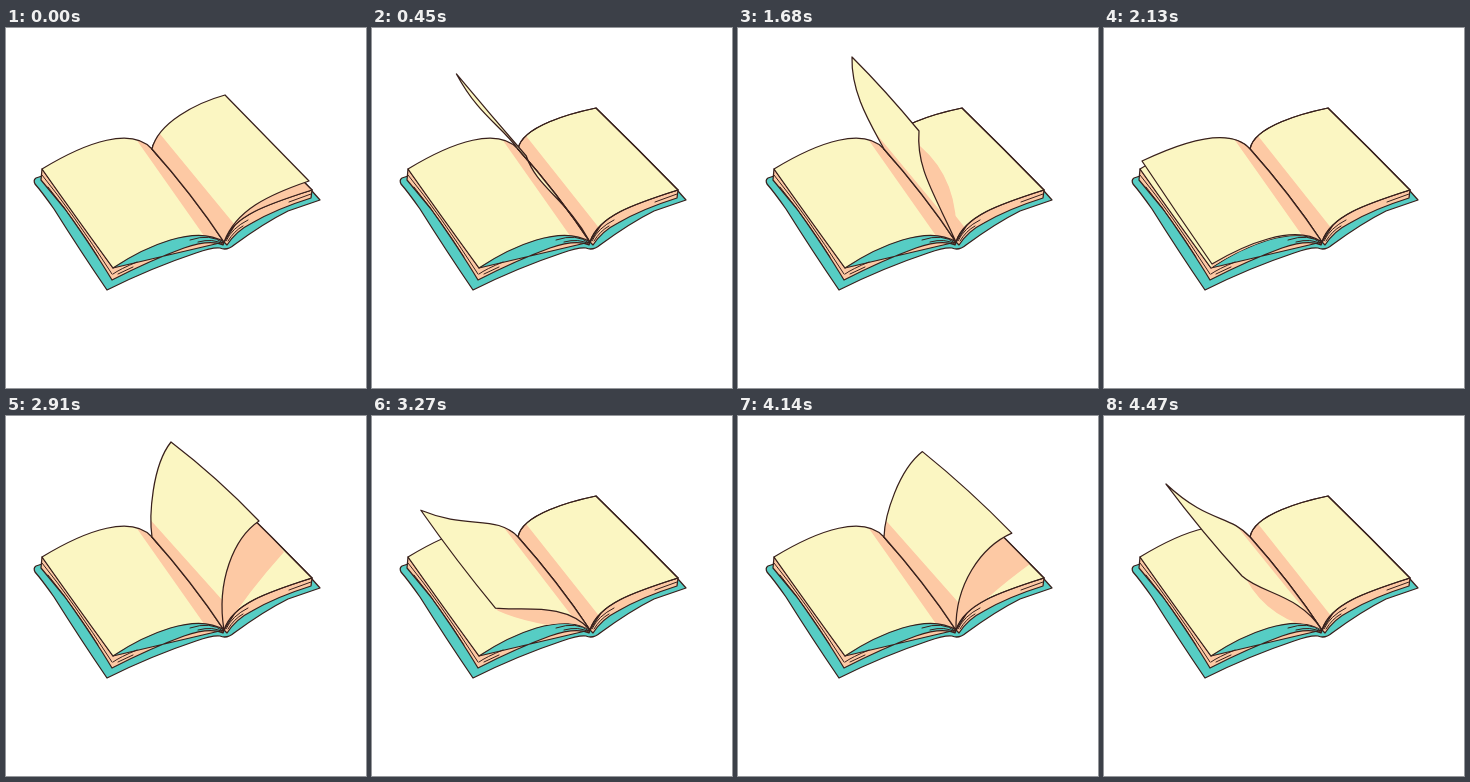
Animation of 360 by 360 pixels, one loop 4500 ms. Source, as an HTML page with a canvas:

```html
<!DOCTYPE html>
<html>
<head>
<meta charset="utf-8">
<style>
  html, body { margin: 0; height: 100%; overflow: hidden; background: #fff; }
  canvas { display: block; width: 100vmin; height: 100vmin; }
</style>
</head>
<body>
<canvas id="stage" width="360" height="360"></canvas>
<script>
const ctx = document.getElementById('stage').getContext('2d');
const PAPER = '#fbf6c2', PINK = '#fdc9a4', TEAL = '#56cdc4', INK = '#38201c';
const LOOP = 4500, FLIP = 1310, STEP = 30;

// Each pose: time, then x,y pairs for the sheet hinged between (146,121) and (218,214):
// top edge (2 controls, corner), outer edge (control, corner), bottom edge (2 controls),
// shadow (control, end).
const poses = [
  [-80, 150,98, 200,85, 224,80, 266,121, 306,162, 262,176, 226,188, 240,192, 306,163],
  [0,   152,95, 190,75, 219,67, 260,109, 303,153, 262,167, 230,182, 240,192, 306,163],
  [290, 143,100, 146,50, 165,26, 212,62, 253,105, 228,122, 210,165, 242,176, 278,136],
  [370, 132,95, 113,65, 114,29, 148,63, 181,103, 178,140, 196,165, 222,152, 182,118],
  [540, 125,98, 105,108, 62,68, 98,116, 138,160, 158,178, 195,178, 165,205, 142,163],
  [820, 126,98, 80,113, 38,133, 72,184, 108,236, 140,217, 190,195, 160,204, 107,240],
  [900, 126,99, 82,113, 36,141, 69,188, 107,240, 140,218, 190,196, 160,204, 107,240]
];
const restRight = poses[0].slice(1), restLeft = poses[poses.length - 1].slice(1);

// Smooth curve through the poses, at rest at both ends.
function poseAt(time) {
  let i = 0;
  while (time > poses[i + 1][0]) i++;
  const a = poses[i], b = poses[i + 1], span = b[0] - a[0], u = (time - a[0]) / span;
  const slope = (k, c) => {
    const p = poses[k - 1], n = poses[k + 1];
    return p && n ? (n[c] - p[c]) / (n[0] - p[0]) * span : 0;
  };
  return a.slice(1).map((v, j) => {
    const c = j + 1, s = u * u * (3 - 2 * u);
    return v + (b[c] - v) * s + slope(i, c) * u * (1 - u) ** 2 - slope(i + 1, c) * u * u * (1 - u);
  });
}

function draw(path, fill, stroke = INK, width = 1.25) {
  if (fill) { ctx.fillStyle = fill; ctx.fill(path); }
  if (stroke) { ctx.strokeStyle = stroke; ctx.lineWidth = width; ctx.stroke(path); }
}

const sheetPath = p => new Path2D(`M146 121C${p.slice(0, 6)}Q${p.slice(6, 10)}C${p.slice(10, 14)} 218 214Q186 166 146 121Z`);

const bezier = (u, a, b, c, d) =>
  a * (1 - u) ** 3 + 3 * b * u * (1 - u) ** 2 + 3 * c * u * u * (1 - u) + d * u ** 3;

function clipped(path, paint) {
  ctx.save();
  ctx.clip(path);
  paint();
  ctx.restore();
}

function sheet(p) {
  const path = sheetPath(p), u = 0.21;
  const top = [bezier(u, 146, p[0], p[2], p[4]), bezier(u, 121, p[1], p[3], p[5])];
  const low = [bezier(u, 218, p[12], p[10], p[8]), bezier(u, 214, p[13], p[11], p[9])];
  draw(path, PAPER, null);
  clipped(path, () => draw(new Path2D(
    `M146 121C${p[0]} ${p[1]} ${top} ${top}L${low}L218 214Q186 166 146 121Z`), PINK, null));
  draw(path);
}

const cover = new Path2D('M36 148L30 150Q27 152 29 156Q36 164 48 181Q75 224 101 262Q145 240 190 225Q207 219 214 220Q221 223 228 217Q258 195 282 183L314 172L306 163L218 205Z');
const leftBlock = new Path2D('M36 141L35 152Q45 164 59 181Q88 222 106 252Q145 232 178 220Q204 211 217 217L218 214L107 240Z');
const rightBlock = new Path2D('M306 162L305 170Q270 181 246 195Q230 203 221 217L218 214L240 180Z');
const leaves = new Path2D('M36 147Q66 184 106 246M42 159Q70 194 92 229M107 246Q114 241 131 234M112 246L127 239M184 212Q205 205 217 215M192 214Q207 210 217 216M220 213Q226 200 242 192M222 213Q228 203 237 198M283 174L305 166');
const bothPages = new Path2D();
[restLeft, restRight].forEach(p => bothPages.addPath(sheetPath(p)));

function render(time) {
  ctx.fillStyle = '#fff';
  ctx.fillRect(0, 0, 360, 360);
  draw(cover, TEAL);
  draw(leftBlock, PINK);
  draw(rightBlock, PINK);
  draw(leaves, null, INK, 1);
  sheet(restLeft);
  sheet(restRight);

  let phase = time % FLIP;
  if (phase > FLIP - 80) phase -= FLIP;
  if (phase >= 900) return;
  const p = poseAt(phase);
  clipped(bothPages, () => draw(new Path2D(
    `M218 214Q${p.slice(14, 18)}L${p[8]} ${p[9]}L146 121Z`), PINK, null));
  draw(sheetPath(restRight));
  sheet(p);
}

ctx.lineJoin = ctx.lineCap = 'round';
function tick() {
  render(Math.floor(performance.now() % LOOP / STEP) * STEP);
  requestAnimationFrame(tick);
}
tick();
</script>
</body>
</html>
```
